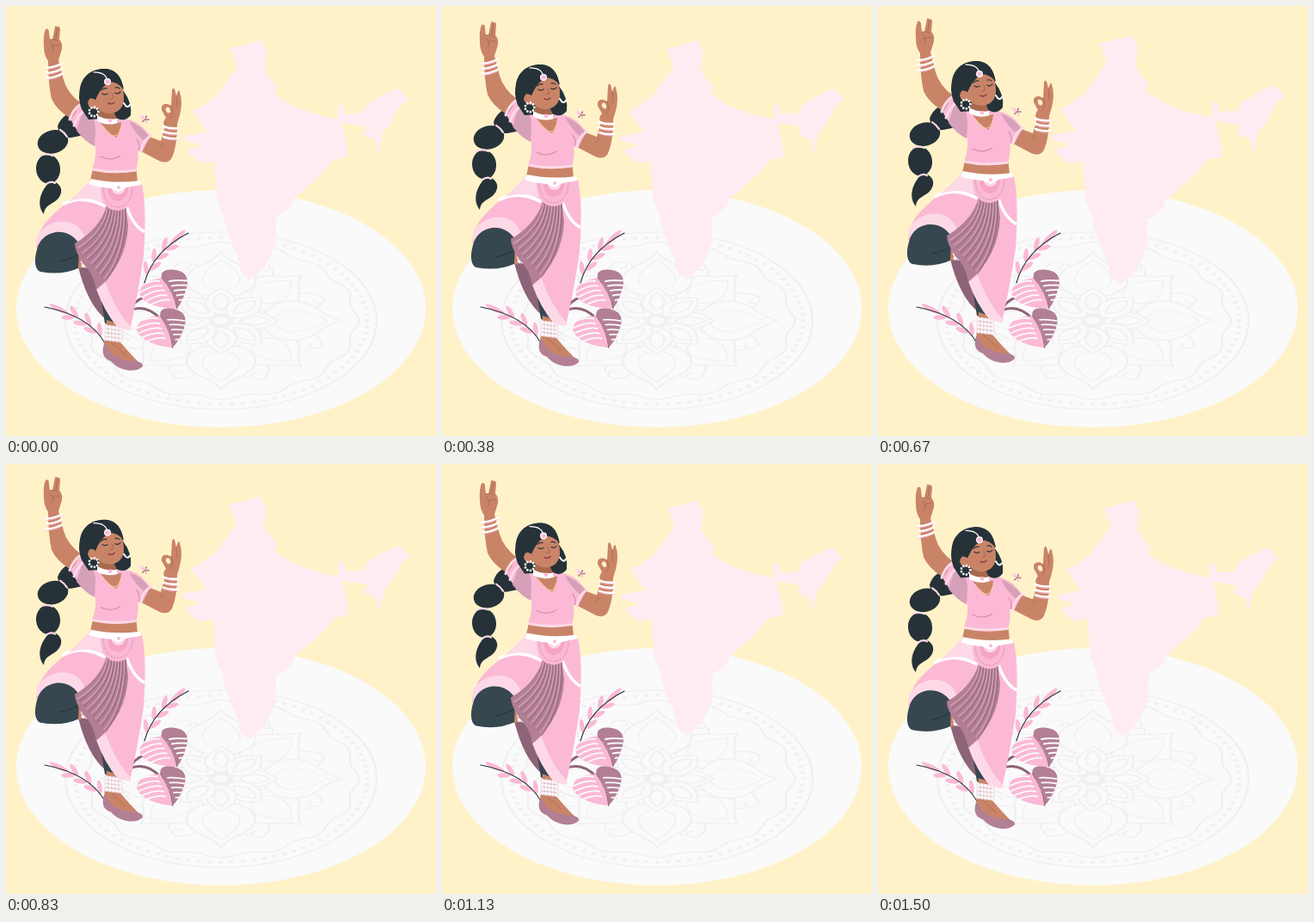
These frames come from a looping animation (500x500 px, 1540 ms). An HTML page with a canvas:

```html
<!DOCTYPE html>
<html lang="en">
<head>
<meta charset="utf-8">
<title>Dancer and map</title>
<style>
html, body { margin: 0; width: 100%; height: 100%; overflow: hidden; background: #fff2c8; }
canvas { display: block; width: 500px; height: 500px; }
</style>
</head>
<body>
<canvas id="stage" width="500" height="500"></canvas>
<script>
const ctx = document.getElementById('stage').getContext('2d');
const LOOP = 1540, BEAT = 1510, LEAD = 25, TAU = Math.PI * 2;
const CREAM = '#fff2c8', FLOOR = '#fafafa', LINE = '#f0f0f0', MAP = '#ffecf2';
const PINK = '#fbb9d5', PALE = '#fdd9e7', ROSE = '#d5a0b8', MAUVE = '#b27f95', PLUM = '#8d6377';
const HAIR = '#263238', SLATE = '#37474f', SKIN = '#c98468', TAN = '#a9694d';

const fill = (color, d) => { ctx.fillStyle = color; ctx.fill(new Path2D(d)); };
const line = (color, width, d) => {
  ctx.strokeStyle = color;
  ctx.lineWidth = width;
  ctx.stroke(new Path2D(d));
};
const oval = (color, x, y, rx, ry = rx, turn = 0) => {
  ctx.fillStyle = color;
  ctx.beginPath();
  ctx.ellipse(x, y, rx, ry, turn, 0, TAU);
  ctx.fill();
};
const ring = (color, width, x, y, r) => {
  ctx.strokeStyle = color;
  ctx.lineWidth = width;
  ctx.beginPath();
  ctx.arc(x, y, r, 0, TAU);
  ctx.stroke();
};
const placed = (draw, x, y, sx = 1, sy = sx, turn = 0) => {
  ctx.save();
  ctx.translate(x, y);
  ctx.scale(sx, sy);
  ctx.rotate(turn);
  draw();
  ctx.restore();
};
const repeat = (count, draw) => { for (let i = 0; i < count; i++) draw(i); };
const around = (count, start, draw) =>
  repeat(count, i => placed(() => draw(i), 0, 0, 1, 1, (i + start) / count * TAU));

function outlined(d, width) {
  fill(FLOOR, d);
  line(LINE, width, d);
}

function mandala() {
  ring(LINE, 2.4, 0, 0, 181);
  around(84, 0, () => oval(LINE, 170, 0, 3, 2.6));
  ctx.beginPath();
  repeat(361, i => {
    const a = i / 360 * TAU, r = 157 + 3.5 * Math.cos(16 * a);
    ctx.lineTo(r * Math.cos(a), r * Math.sin(a));
  });
  ctx.stroke();
  around(8, .5, () => line(LINE, 2.2, 'M90-18Q112-18 122-8Q134 4 122 11Q112 12 115 3M90 18Q104 25 119 15'));
  const petal = () => {
    outlined('M48 0C50-30 70-44 91-39C111-34 116-12 140 0C116 12 111 34 91 39C70 44 50 30 48 0Z', 2.4);
    line(LINE, 1.6, 'M60 0C70-30 95-28 124 0C95 28 70 30 60 0Z');
  };
  around(4, .5, () => placed(petal, 0, 0, .94));
  around(4, 0, petal);
  around(8, 0, () => outlined('M12 0C24-25 47-23 66 0C47 23 24 25 12 0ZM21 0Q39-17 57 0Q39 17 21 0Z', 2.2));
  oval(LINE, 0, 0, 13);
  oval(FLOOR, 0, 0, 8);
}

// Joins key points with a border that wanders a little to either side.
function rugged(outline, seed) {
  const points = outline.split(' ').map(p => p.split(',').map(Number));
  const random = () => (seed = seed * 16807 % 2147483647) / 2147483647 - .5;
  const path = new Path2D();
  points.forEach(([x, y], i) => {
    const [nx, ny] = points[(i + 1) % points.length];
    const steps = Math.ceil(Math.hypot(nx - x, ny - y) / 7);
    path.lineTo(x, y);
    for (let s = 1; s < steps; s++) {
      path.lineTo(x + (nx - x) * s / steps + 2 * random(), y + (ny - y) * s / steps + 2 * random());
    }
  });
  path.closePath();
  return path;
}
const mainland = rugged('262,51 275,49 297,42 305,56 301,75 309,88 317,95 313,104 336,118 367,129 ' +
  '384,132 386,115 392,117 392,126 398,136 389,138 396,163 397,175 380,179 357,205 334,224 ' +
  '333,231 314,245 314,274 303,300 284,316 276,309 263,271 247,225 244,181 229,183 212,169 ' +
  '228,162 209,157 210,151 237,147 219,124 245,107 270,73', 11);
const northeast = rugged('391,126 414,126 418,115 444,101 454,98 466,109 458,115 447,135 ' +
  '436,149 431,171 427,156 413,150 418,142 391,136', 5);

function leafHalf(color, d, side) {
  ctx.save();
  ctx.clip(new Path2D(d));
  fill(color, d);
  repeat(5, i => {
    const x = 184 + i * 2.9, y = 321 + i * 5.5;
    line(FLOOR, 1.8, `M${x + side * 6} ${y - 1}Q${x + side * 15} ${y - 3} ${x + side * 32} ${y + 3 - side * 4}`);
  });
  ctx.restore();
}

function monstera() {
  leafHalf(PINK, 'M181 316C170 318 156 321 155 334C158 347 180 352 199 352Q196 331 181 316Z', -1);
  leafHalf(MAUVE, 'M181 316C178 307 190 305 198 307C212 309 213 321 209 331Q206 343 199 352Q196 331 181 316Z', 1);
  line(PLUM, 1, 'M181 316Q196 333 199 352');
}

// Leaves in pairs along a curved stem: the upper ones stand up, the lower ones lie along it.
function sprig([ax, ay], [bx, by], [cx, cy], side) {
  const leaf = (t, lean, length) => {
    const u = 1 - t;
    const x = u * u * ax + 2 * u * t * bx + t * t * cx, y = u * u * ay + 2 * u * t * by + t * t * cy;
    const heading = Math.atan2(u * (by - ay) + t * (cy - by), u * (bx - ax) + t * (cx - bx));
    placed(() => oval(PINK, length + 1, 0, length, 2.8), x, y, 1, 1, heading + lean * side);
  };
  repeat(3, i => {
    leaf(.12 + i * .22, .5, 8);
    leaf(.2 + i * .2, -.5, 8);
  });
  leaf(.7, .08, 12);
  line(HAIR, 1.1, `M${ax} ${ay}Q${bx} ${by} ${cx} ${cy}`);
}

function plants() {
  line(PLUM, 3, 'M144 354C151 337 169 336 183 336M144 354Q162 346 179 363');
  monstera();
  placed(() => placed(monstera, -182, -330), 179, 374, 1, 1, .1);
  sprig([161, 322], [171, 285], [212, 264], -1);
  sprig([115, 392], [97, 360], [45, 350], 1);
}

function bracelets(x, y, width, tilt) {
  repeat(3, i => {
    const top = y + i * 6;
    line('#fff', 2.6, `M${x} ${top}q${width / 2} ${2 + tilt / 2} ${width} ${tilt}`);
    line(PINK, .8, `M${x} ${top + 2}q${width / 2} ${2 + tilt / 2} ${width} ${tilt}`);
  });
}

function beads(x, y, cols, rows, slant = 0) {
  repeat(cols * rows, i => {
    const c = i % cols, r = (i - c) / cols;
    const bx = x + c * 4 + r * slant, by = y + r * 4.6 + c * .5;
    oval('#fff', bx, by, 2.5);
    ring('#d8b5c4', .5, bx, by, 2.2);
  });
}

function ponytail() {
  fill(HAIR, 'M90 121Q65 123 60 140Q62 154 76 153L91 150Z');
  oval(HAIR, 54.5, 158, 18, 13.5, -.25);
  oval(HAIR, 49, 189.5, 14, 17, -.1);
  fill(HAIR, 'M52 203C64 206 67 214 62 222C56 231 45 230 44 242C36 232 38 217 52 203Z');
  line(PALE, 2.2, 'M63 144Q68 147 71 152M40 174Q47 171 54 174M47 207Q52 203 57 206');
}

function raisedArm() {
  fill(SKIN, `M49 64Q44 57 44 47Q43 34 46 27Q50 25 50 31L51 39L54 39L57 24Q59 22 60 25Q62 22 63 27
    L62 39Q66 43 65 50Q63 57 61 63L67 86Q71 101 88 114L75 131Q58 120 53 108Q49 90 49 64Z`);
  line(TAN, .9, 'M51 39Q57 38 60 40M53 48Q58 44 62 46M52 43Q58 50 53 54M60 25L58 38');
  bracelets(47, 72, 18, -5);
}

function bentArm() {
  fill(SKIN, `M164 151L180 157L185 140Q181 136 186 130L181 121Q180 113 188 114L192 116
    L193 98Q195 92 197 100L198 105Q201 95 202 100Q206 112 202 127L199 137
    Q199 165 192 178Q187 184 178 180L157 169Z`);
  oval(CREAM, 188.5, 121, 2.5, 3.5, -.4);
  line(TAN, .8, 'M192 116Q196 125 191 130M198 105L199 118M178 164Q182 163 182 159');
  bracelets(183, 140, 17, 2);
}

function legs() {
  fill(PLUM, 'M83 299L99 300L113 328L118 366Q94 348 83 299Z');
  fill(SLATE, 'M108 325L119 339Q129 355 128 373L115 369Z');
  fill(SKIN, 'M117 365L132 370L133 391Q145 405 154 414Q143 421 127 412L114 396Z');
  fill(MAUVE, 'M114 393Q119 396 121 403Q135 414 152 413Q160 415 159 419Q152 426 139 423Q129 421 122 413Q109 409 114 393Z');
  line(TAN, .8, 'M123 392Q132 399 138 406');
  beads(117, 373, 5, 4);
}

function skirt() {
  fill(PINK, 'M98 203C75 232 37 244 35 281L87 283L121 239L142 212Z');
  fill(PALE, 'M36 267C52 244 83 246 91 267L86 281Q65 254 35 279Z');
  line('#fff', 4, 'M67 230Q89 219 114 232');
  fill(PALE, 'M97 203Q81 221 72 228Q92 220 112 228L126 210Z');
  fill(PINK, 'M138 211L158 207Q164 234 160 291Q153 338 144 377L130 374Q116 356 105 329Q140 294 139 238Z');
  fill(PALE, 'M105 329L116 322Q127 354 146 374L144 377L130 374Q114 355 105 329Z');
  line('#fff', 3.5, 'M139 229Q146 254 160 262');

  fill(SLATE, 'M87 282C82 267 70 262 58 263C46 265 39 272 36 283C32 297 34 307 40 309Q65 314 86 304Z');
  line(HAIR, 1, 'M62 297Q75 295 84 289');
  fill(SKIN, 'M85 282L90 285L92 303L84 306Z');
  beads(88, 288, 3, 4, .7);

  fill(MAUVE, 'M117 233Q108 260 80 276Q80 285 90 300Q102 311 105 330Q140 300 142 255L139 233Z');
  repeat(7, i => {
    const x = 118 + i * 3.2, endX = 84 + i * 5, endY = 281 + i * 6;
    line(ROSE, 1.3, `M${x} 235Q${x - 4 + i} ${262 + i * 4} ${endX} ${endY}`);
    line(PLUM, .9, `M${x + 2} 235Q${x - 2 + i} ${262 + i * 4} ${endX + 2} ${endY + 3}`);
  });

  fill(PINK, 'M110 208Q109 237 130 238Q151 236 150 206Z');
  ctx.setLineDash([2, 2]);
  line('#d991b0', 1, 'M113 210Q114 233 130 234Q147 232 147 209');
  ctx.setLineDash([]);
  fill('#f5a5c5', 'M118 209Q118 226 130 227Q143 225 142 208Z');
  fill(PALE, 'M122 209Q123 219 131 219Q139 218 139 208Z');
  fill('#fff', 'M99 201Q127 207 156 203L157 208L140 211L131 216L122 212Q107 211 96 207Z');
  oval(PINK, 131, 211, 2);
}

function torso() {
  fill(SKIN, 'M102 184L151 184L153 205Q126 209 98 203Z');
  fill(PINK, `M87 114Q95 121 107 121L131 130Q144 130 157 139L168 151L158 170L153 168
    Q155 177 151 192Q125 197 100 191Q105 177 104 163Q88 156 75 132Z`);
  fill(ROSE, 'M90 119Q103 126 104 143L103 163Q92 158 82 145Z');
  fill(ROSE, 'M143 134Q157 139 166 151L160 156Q150 148 143 134Z');
  line(PALE, 3, 'M87 114Q78 120 74 132M94 119Q83 127 79 139M168 151Q158 158 157 169M101 190Q124 195 151 191');
  line('#d88aaf', 1.1, 'M110 175Q122 181 133 174M152 155Q157 163 154 168');
}

function head() {
  fill(HAIR, 'M88 120Q82 105 88 94Q94 73 116 73Q135 75 136 98Q147 112 145 127Q138 136 128 130L96 132Z');
  fill(TAN, 'M109 116L125 122L130 134Q127 153 107 132Z');
  fill(SKIN, 'M107 131Q121 138 134 135Q133 149 128 153Q116 146 107 131Z');
  fill(SKIN, 'M104 109Q96 104 95 113Q97 122 107 119Q112 125 122 125Q135 123 137 110Q138 94 129 88Q114 86 104 109Z');
  fill(HAIR, 'M86 108C83 87 95 73 114 73Q133 74 137 97Q130 88 119 88Q109 93 104 109Q96 101 94 118Q87 117 86 108Z');
  fill('#fff', 'M106 127Q116 133 129 131L130 136Q118 140 106 134Z');
  oval(PINK, 121, 133, 2.3);
  line('#f6cf86', 1, 'M113 140Q120 155 130 150L134 141');
  line('#fff', 1.2, 'M102 77Q117 77 118 88');
  oval('#fff', 118, 88, 4);
  oval(PINK, 118, 88, 2.7);
  line(HAIR, 1.2, 'M112 102Q115 104 118 102M127 101Q130 103 133 100M111 98Q113 95 117 96M127 95Q130 94 132 96');
  line(TAN, 1, 'M123 101L125 107L121 108');
  line('#8f3a45', 1.5, 'M119 113Q123 115 126 112');
  placed(() => around(9, 0, () => oval('#fff', 5.3, 0, 1.4)), 102, 123);
  line('#fff', 2, 'M137 113Q141 120 144 115');
}

function blossom() {
  oval(PALE, 158.5, 129, 3.5, 2, .7);
  placed(() => around(5, 0, i => oval(i % 2 ? PINK : MAUVE, 3, 0, 1.8, 1)), 162, 132);
  oval('#a34b70', 162, 132, 1);
}

function dancer() {
  ponytail();
  raisedArm();
  bentArm();
  legs();
  torso();
  skirt();
  head();
  blossom();
}

// Two linear pulses followed by a rest.
function pulse(p) {
  if (p < .1) return p / .1;
  if (p < .3) return (.3 - p) / .2;
  return Math.max(0, 1 - Math.abs(p - .5) / .1);
}

function render(now) {
  const p = Math.min((now % LOOP + LEAD) / BEAT, 1);
  const size = 1 + .1 * pulse(p);
  const lift = 10 * (1 - Math.abs(2 * p - 1));
  ctx.lineCap = ctx.lineJoin = 'round';
  ctx.fillStyle = CREAM;
  ctx.fillRect(0, 0, 500, 500);
  oval(FLOOR, 250, 352, 238, 138);
  placed(mandala, 250, 366, 1, .57);
  placed(() => {
    ctx.translate(-337, -179);
    ctx.fillStyle = MAP;
    ctx.fill(mainland);
    ctx.fill(northeast);
  }, 337, 179, size);
  plants();
  placed(dancer, 0, .3 - lift);
  requestAnimationFrame(render);
}
requestAnimationFrame(render);
</script>
</body>
</html>
```
